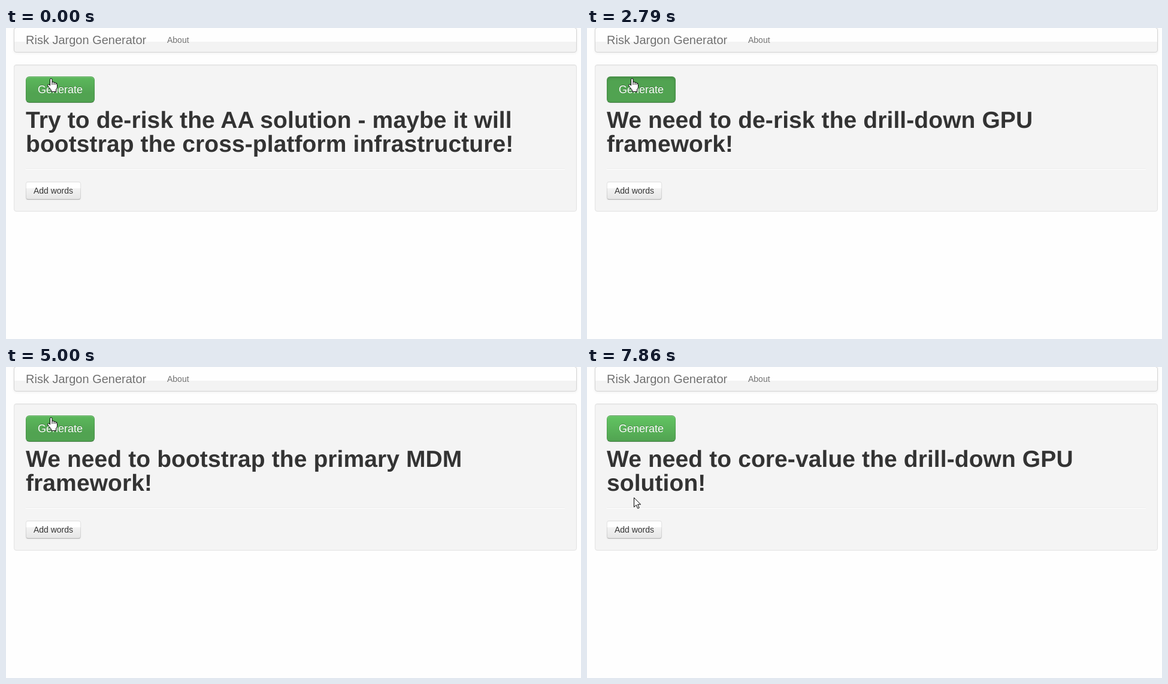
These frames come from a looping animation (960x520 px, 8000 ms). An HTML page:

```html
<!DOCTYPE html>
<html lang="en">
<head>
<meta charset="utf-8">
<title>Jargon generator</title>
<style>
* { box-sizing: border-box; }
html, body { margin: 0; width: 100%; height: 100%; overflow: hidden; background: #fefefe; }
body {
  position: relative;
  font: 14px/20px "Liberation Sans", Arial, sans-serif;
  color: #333;
  white-space: nowrap;
}
body > * { position: absolute; }
.nav {
  left: 13px; top: -1px; width: 940px; height: 42px;
  border: 1px solid #d4d4d4; border-radius: 4px;
  background: linear-gradient(#fefefe 23px, #f3f3f3 23px);
  box-shadow: 0 1px 4px rgba(0,0,0,.065);
}
.brand, .about { top: 10px; color: #707070; text-shadow: 0 1px 0 #fff; }
.brand { left: 33px; font-size: 20px; }
.about { left: 269px; }
.panel {
  left: 13px; top: 61px; width: 940px;
  background: #f4f4f4; border: 1px solid #e3e3e3; border-radius: 4px;
  box-shadow: inset 0 1px 1px rgba(0,0,0,.05);
}
.btn {
  left: 33px; text-align: center;
  border: 1px solid; border-color: rgba(0,0,0,.1) rgba(0,0,0,.1) rgba(0,0,0,.25);
  box-shadow: inset 0 1px 0 rgba(255,255,255,.2), 0 1px 2px rgba(0,0,0,.05);
  background-repeat: repeat-x;
}
.generate {
  top: 81px; width: 115px; height: 44px; padding: 11px 0;
  font-size: 18px; color: #fff; text-shadow: 0 -1px 0 rgba(0,0,0,.25);
  border-radius: 6px;
  background-color: #51a351; background-image: linear-gradient(#62c462, #51a351);
}
.generate.hover { background-position: 0 -15px; }
.generate.pressed {
  background: #51a351;
  box-shadow: inset 0 2px 4px rgba(0,0,0,.15), 0 1px 2px rgba(0,0,0,.05);
}
.add {
  width: 92px; height: 30px; padding: 4px 0; border-radius: 4px;
  border-bottom-color: #b3b3b3;
  text-shadow: 0 1px 1px rgba(255,255,255,.75);
  background-color: #f5f5f5;
  background-image: linear-gradient(#fff 10px, #f3f3f3 10px, #e6e6e6);
}
.rule { left: 33px; width: 900px; height: 2px; border-top: 1px solid #eee; border-bottom: 1px solid #fff; }
h1 {
  left: 33px; top: 133px; margin: 0;
  font-size: 39px; line-height: 43px; letter-spacing: .09px;
  text-rendering: geometricPrecision;
}
h1 span { display: block; height: 40px; }
svg { left: 0; top: 0; overflow: visible; }
svg path { fill: #fff; stroke: #000; stroke-linejoin: round; }
</style>
</head>
<body>
<div class="nav"></div>
<div class="brand">Risk Jargon Generator</div>
<div class="about">About</div>
<div class="panel"></div>
<div class="btn generate">Generate</div>
<h1></h1>
<div class="rule"></div>
<div class="btn add">Add words</div>
<svg width="20" height="24"><path></path></svg>
<script>
const LOOP = 8000;
const phrases = [
  ["Try to de-risk the AA solution - maybe it will", "bootstrap the cross-platform infrastructure!"],
  ["We need to de-risk the drill-down GPU", "framework!"],
  ["Try to stress-test the VaR infrastructure - maybe", "it will leverage the simulation-based", "implementation!"],
  ["We need to bootstrap the primary MDM", "framework!"],
  ["We need to core-value the drill-down GPU", "solution!"]
];
const cursors = {
  hand: "M4.5 12V2.3Q4.5 .5 6.2 .5T8 2.3V6.3Q10.8 5.3 11.2 7.2Q13.6 6.4 14.2 8.2Q16.5 8 16.5 10.4V14.5Q16.5 16.5 14.5 19V22.5H6.5V20L1.6 14Q-.2 11.2 1.3 10.3Q2.6 9.7 4.5 12ZM8 6.3V11M11.2 7.2V11M14.2 8.2V11",
  arrow: "M.5 .5V16.2L4.2 12.7 6.8 18.5 9.2 17.4 6.6 11.8H11.6Z"
};

// start time, phrase, button state, cursor, cursor x, cursor y
const steps = [
  [0, 0, "hover", "hand", 69, 84],
  [1330, 0, "pressed", "hand", 69, 84],
  [1450, 1, "hover", "hand", 69, 84],
  [2790, 1, "pressed", "hand", 69, 84],
  [3070, 2, "hover", "hand", 69, 84],
  [4720, 2, "pressed", "hand", 69, 84],
  [5000, 3, "hover", "hand", 69, 84],
  [6750, 3, "pressed", "hand", 69, 84],
  [7030, 4, "hover", "hand", 69, 84],
  [7470, 4, "hover", "hand", 70, 86],
  [7610, 4, "hover", "hand", 71, 101],
  [7740, 4, "", "arrow", 78, 168],
  [7860, 4, "", "arrow", 78, 218]
];

const $ = selector => document.querySelector(selector);
const heading = $("h1"), button = $(".generate"), pointer = $("svg");
let shown;

function show([, phrase, state, cursor, x, y]) {
  const lines = phrases[phrase];
  heading.innerHTML = lines.map(text => `<span>${text}</span>`).join("");
  const end = 135 + 40 * lines.length;
  $(".rule").style.top = end + 20 + "px";
  $(".add").style.top = end + 42 + "px";
  $(".panel").style.height = end + 31 + "px";
  button.className = "btn generate " + state;
  pointer.firstChild.setAttribute("d", cursors[cursor]);
  pointer.style.transform = `translate(${x}px, ${y}px)`;
}

const start = performance.now();
function tick() {
  const time = (performance.now() - start) % LOOP;
  const step = steps.findLast(s => s[0] <= time);
  if (step !== shown) show(shown = step);
  requestAnimationFrame(tick);
}
tick();
</script>
</body>
</html>
```
